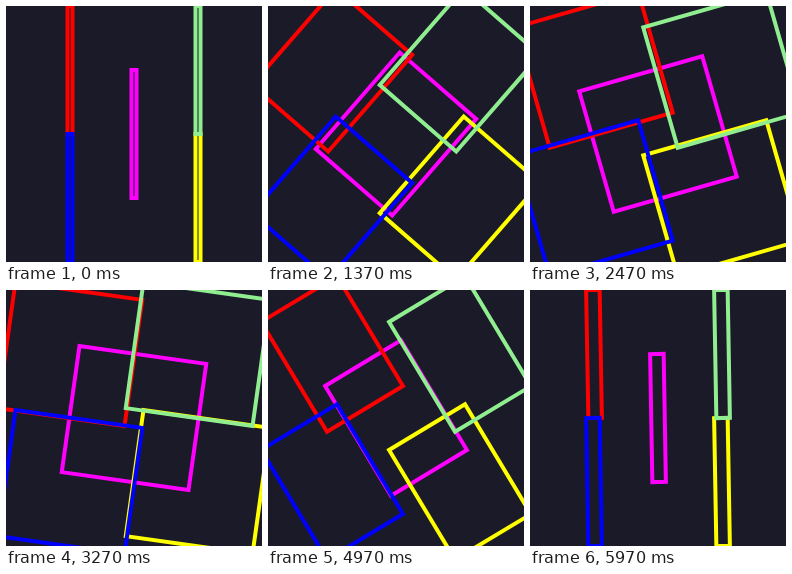
An HTML page for the animation above (6.01 s loop, 256 px wide and 256 px high).

```html
<!DOCTYPE html>
<html lang="en">
<head>
<meta charset="utf-8">
<title>Turning frames</title>
<style>
  html, body { margin: 0; width: 100%; height: 100%; overflow: hidden; background: #1a1a28; }
  svg { display: block; width: 100vw; height: 100vh; }
  rect { fill: none; stroke-width: 4; }
</style>
</head>
<body>
<svg id="stage" viewBox="0 0 256 256"></svg>
<script>
const LOOP = 6010;
const STEPS = 180;
const SIZE = 128;

// Listed from back to front: centre and colour.
const frames = [
  [128, 128, '#ff00ff'],
  [64, 64, '#ff0000'],
  [192, 192, '#ffff00'],
  [192, 64, '#90ee90'],
  [64, 192, '#0000ff']
].map(([x, y, color]) => {
  const node = document.createElementNS('http://www.w3.org/2000/svg', 'rect');
  node.setAttribute('stroke', color);
  node.setAttribute('y', -SIZE / 2);
  node.setAttribute('height', SIZE);
  document.getElementById('stage').append(node);
  return { node, x, y };
});

// One degree per step, thirty steps per second.
function angleAt(time) {
  return Math.min(STEPS - 1, Math.floor((time + 5) * 0.03));
}

function widthAt(angle) {
  return Math.max(5, SIZE * Math.sin(angle * Math.PI / 180) ** 0.555);
}

function render(time) {
  const angle = angleAt(time);
  const width = widthAt(angle);
  for (const { node, x, y } of frames) {
    node.setAttribute('x', -width / 2);
    node.setAttribute('width', width);
    node.setAttribute('transform', `translate(${x} ${y}) rotate(${angle})`);
  }
}

const start = performance.now();
function tick() {
  render((performance.now() - start) % LOOP);
  requestAnimationFrame(tick);
}
tick();
</script>
</body>
</html>
```
